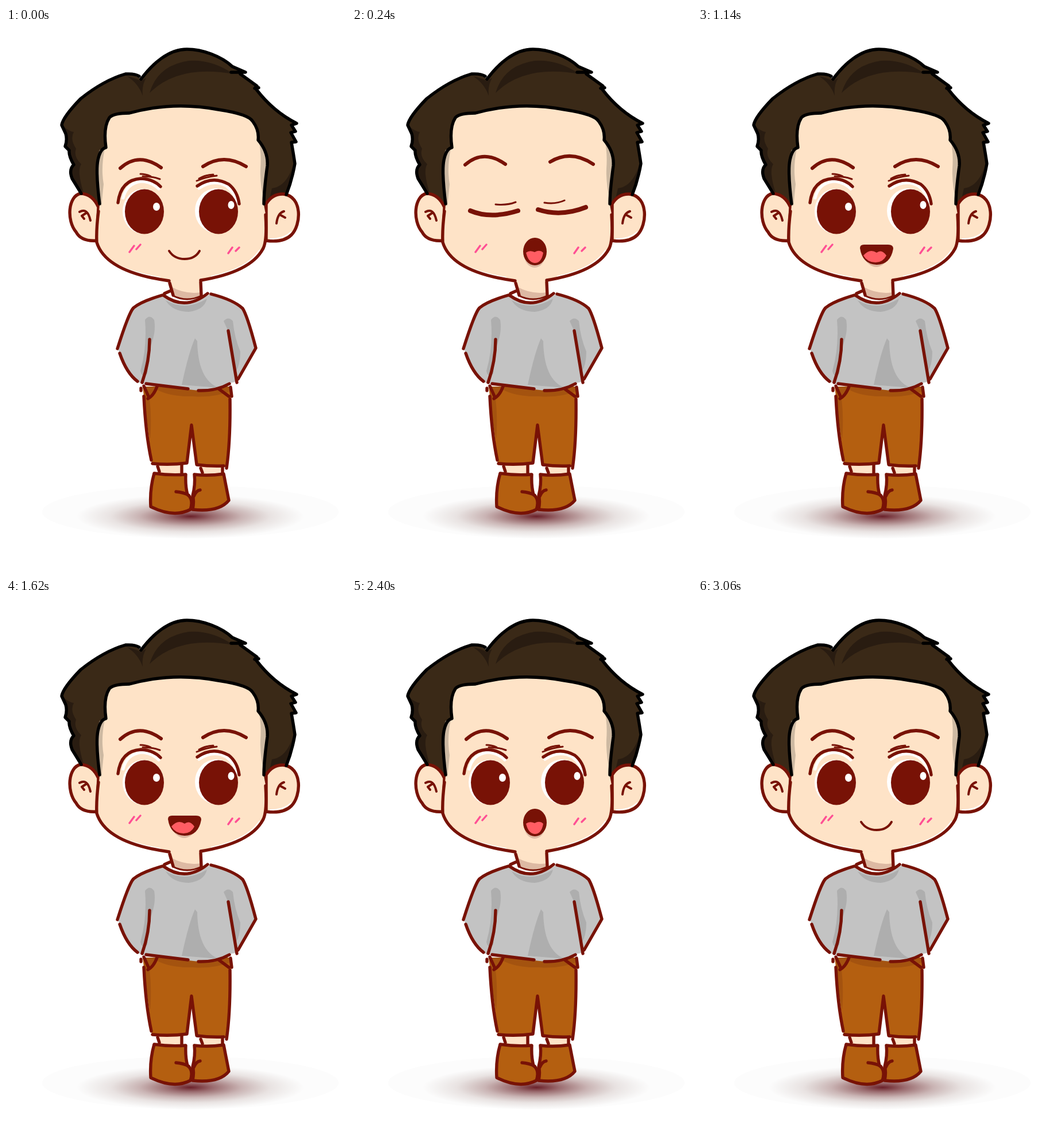
Animation, 592 px wide and 945 px high, one loop 3540 ms. Source, as an HTML page:

```html
<!DOCTYPE html>
<html lang="en">
<head>
<meta charset="utf-8">
<title>Talking boy</title>
<style>
html, body { margin: 0; width: 100%; height: 100%; overflow: hidden; background: #fff; }
svg { display: block; width: 592px; height: 945px; }
path { fill: none; stroke-linecap: round; stroke-linejoin: round; }
.line { stroke: #781206; stroke-width: 5.4; }
.thin { stroke: #781206; stroke-width: 3; }
.lid { stroke: #781206; stroke-width: 8; }
.edge { stroke: #000; stroke-width: 5.4; }
.blush { stroke: #ff4f94; stroke-width: 3.4; }
.glint { stroke: #fff; stroke-width: 5; }
.skin { fill: #fee3c7; }
.tan { fill: #ddb9a3; }
.side { fill: #cdb9a2; }
.hair { fill: #3a2917; }
.lock { fill: #291c11; }
.shirt { fill: #c3c3c3; }
.fold { fill: #aeaeae; }
.pants { fill: #b45f10; }
.crease { fill: #a4530f; }
.dark { fill: #781206; }
.tongue { fill: #ff5d63; }
.white { fill: #fff; }
[data-show] { display: none; }
</style>
</head>
<body>
<svg viewBox="0 0 592 945">
  <defs>
    <radialGradient id="ground">
      <stop offset="0" stop-color="#5a0812" stop-opacity=".9"/>
      <stop offset=".2" stop-color="#5a0c12" stop-opacity=".6"/>
      <stop offset=".45" stop-color="#5a1414" stop-opacity=".31"/>
      <stop offset=".7" stop-color="#5a2820" stop-opacity=".12"/>
      <stop offset="1" stop-color="#5a3c32" stop-opacity="0"/>
    </radialGradient>
  </defs>
  <ellipse cx="321" cy="842" rx="258" ry="46" fill="#444" fill-opacity=".014"/>
  <ellipse cx="321" cy="850" rx="198" ry="38" fill="url(#ground)"/>

  <g id="legs">
    <path class="skin" d="M265 758H306V775H265ZM339 762H378V777H339Z"/>
    <path class="line" d="M264 763L267 772M306 760V774M339 766L342 774M377 766V775"/>
    <path class="pants line" d="M258 775Q285 779 313 777Q312 797 316 812Q327 820 321 838Q292 853 252 833Q250 803 258 775Z"/>
    <path class="pants line" d="M328 777Q352 780 379 776L388 822Q371 843 325 838Q328 822 325 814Q330 794 328 777Z"/>
    <path class="line" d="M296 807Q309 808 318 813M327 815Q331 805 338 804"/>
    <path class="pants" d="M238 624H393L386 764L331 761L323 690L315 758L254 757Z"/>
    <path class="crease" d="M240 624H392V632Q360 644 325 641Q285 642 262 629L250 645Q254 680 251 715Q242 680 240 624Z"/>
    <path class="line" d="M240 641Q243 705 253 752M255 758Q285 761 315 757L323 691L332 760Q355 763 379 762M390 646Q391 718 384 766M235 627V631M240 623L249 643M263 624Q257 640 247 645M369 627L388 641M391 625L393 641"/>
  </g>

  <g id="torso">
    <path class="shirt" d="M273 465Q235 476 222 487Q214 495 195 558Q207 599 229 616L238 619Q285 626 336 631Q370 631 390 618L403 615L435 557Q420 500 410 487Q393 472 356 463Q313 490 273 465Z"/>
    <path class="fold" d="M242 508Q250 497 258 508Q262 531 250 558L246 602Q237 610 234 597Q246 555 242 508ZM329 540Q318 565 306 621L370 626Q334 612 333 545ZM379 510Q387 501 395 510Q398 540 408 563Q408 586 400 599L387 528ZM278 474Q313 494 350 471Q345 491 318 494Q289 493 278 474Z"/>
    <path class="line" d="M272 465Q235 476 222 487Q214 495 194 558M198 566Q210 601 229 615M250 542Q250 580 237 617M244 619L317 628M335 631Q366 632 389 619M387 527L402 617M404 611L435 557Q420 500 412 488Q396 473 357 463"/>
  </g>

  <g id="head">
    <path class="white" d="M274 463L288 458L292 469Q315 478 341 467L350 462Q313 490 274 463Z"/>
    <path class="skin" d="M283 436H341L340 466Q316 476 291 466Z"/>
    <path class="tan" d="M287 450Q312 464 339 460V467Q316 478 291 466Z"/>
    <path class="line" d="M285 444L291 465M339 442L340 465M274 465Q312 493 351 462M276 462L285 458"/>
    <path class="thin" d="M291 466Q315 478 340 466"/>

    <path class="hair" d="M131 288Q120 270 115 262Q109 246 118 238Q109 223 110 213L103 206Q107 195 104 184L97 169Q99 155 130 123Q170 91 208 80Q225 80 235 89C255 62 283 37 315 37C342 37 375 49 394 67L417 78L412 80L437 100L436 107Q465 145 506 166L497 170L505 181L498 183L505 198L498 200Q501 222 503 236Q498 265 488 290L450 330H163Z"/>
    <path class="lock" d="M211 84Q228 88 234 92L244 87Q236 100 238 118Q231 97 211 84ZM250 113Q264 65 318 57Q358 54 396 80Q300 63 250 113ZM98 169Q107 179 118 181Q111 194 122 210Q117 224 131 237Q123 248 135 287Q119 268 112 250L118 238L110 213L103 206Q107 195 104 184ZM500 239Q488 276 463 279L458 302L488 290Z"/>
    <path class="skin line" d="M161 312Q151 289 130 288C108 292 105 335 122 355Q131 372 158 370ZM453 306Q464 288 483 289C517 293 514 343 497 360Q483 374 453 370Z"/>
    <path class="skin" d="M163 308Q156 250 160 230Q164 210 174 208Q169 173 180 156Q187 148 215 148Q290 127 370 142Q423 150 430 163Q441 178 439 195Q457 216 455 240L449 308L452 324Q455 372 447 385Q425 425 339 439L284 440Q175 425 157 372Z"/>
    <path class="side" d="M163 212L172 210Q165 243 170 272L166 310L160 295Q156 230 163 212ZM440 195Q457 215 455 240L450 305Q442 274 443 245Q445 217 440 195Z"/>
    <path class="edge" d="M131 288Q120 270 115 262Q109 246 118 238Q109 223 110 213L103 206Q107 195 104 184L97 169Q99 155 130 123Q170 91 208 80Q225 79 232 84M235 89C255 62 283 37 315 37C342 37 375 49 394 67L417 77L392 77M408 80L437 101L433 105L440 104M436 107Q465 145 506 166L497 169L504 180L496 182L505 198L497 199Q501 222 503 236Q498 265 488 290"/>
    <path class="edge" d="M163 306Q156 250 160 230Q164 210 174 208Q169 173 180 156Q187 148 215 148Q290 127 370 142Q423 150 430 163Q441 178 439 195Q457 216 455 240Q449 284 449 306"/>
    <path class="glint" style="stroke-width:2" d="M169 394Q195 422 268 434M460 367Q484 367 496 355M358 432Q420 419 441 387"/>
    <path class="line" d="M161 319Q157 350 158 373Q174 425 284 440M452 325Q455 372 447 385Q425 425 339 439"/>
    <path class="line" style="stroke-width:4" d="M128 320Q142 312 147 335M141 321L132 327L136 332M471 340Q473 322 484 319M477 325L486 330"/>
    <path class="blush" d="M215 390L223 379M227 385L234 377M387 392L394 382M400 388L406 382"/>

    <g data-show="open">
      <ellipse class="white" cx="239" cy="319" rx="36" ry="39"/>
      <ellipse class="white" cx="366" cy="318" rx="37" ry="39"/>
      <path class="glint" d="M204 296Q210 270 236 267Q254 268 266 280M336 279Q361 262 384 275Q398 286 402 303"/>
      <ellipse class="dark" cx="241" cy="319.500" rx="34" ry="39"/>
      <ellipse class="dark" cx="370" cy="319.500" rx="34" ry="39"/>
      <ellipse class="white" cx="262" cy="311" rx="6" ry="7"/>
      <ellipse class="white" cx="392" cy="308" rx="5.500" ry="7"/>
      <path class="line" d="M195 304Q200 264 235 262Q257 263 269 276M333 275Q360 256 388 272Q403 284 406 306"/>
      <path class="line" style="stroke-width:6" d="M199 244Q231 215 270 243M343 241Q379 217 418 241"/>
      <path class="thin" d="M234 254Q244 254 252 258M238 258Q254 258 268 263M332 266Q348 259 367 257M336 262Q349 255 361 255"/>
    </g>
    <g data-show="closed">
      <path class="lid" d="M206 318Q241 333 289 318M324 316Q364 329 407 312"/>
      <path class="line" style="stroke-width:6" d="M197 238Q229 210 267 237M345 233Q381 211 420 237"/>
      <path class="thin" d="M250 307Q270 309 285 303M335 304Q355 307 370 300"/>
    </g>

    <path class="line" style="stroke-width:4" data-show="smile" d="M284 388Q293 402 311 402Q329 402 337 388"/>
    <g data-show="small">
      <path class="tan" d="M286 397Q310 435 335 397Z"/>
      <path class="dark" d="M282 383Q282 377 289 377H331Q340 377 340 384Q335 412 311 412Q286 411 282 383Z"/>
      <path class="tongue" d="M288 396Q299 383 311 391Q320 384 328 396Q322 408 309 408Q295 408 288 396Z"/>
    </g>
    <g data-show="wide">
      <path class="tan" d="M286 400Q310 432 335 398Z"/>
      <path class="dark" d="M281 376Q282 367 291 367H331Q340 368 340 378Q335 413 311 413Q284 410 281 376Z"/>
      <path class="white" d="M302 373H321L319 376H304Z"/>
      <path class="tongue" d="M287 395Q298 383 309 391Q318 383 328 393Q323 408 310 408Q295 408 287 395Z"/>
    </g>
    <g data-show="round">
      <ellipse class="tan" cx="318" cy="392" rx="19" ry="25"/>
      <ellipse class="dark" cx="318.500" cy="389" rx="20.500" ry="24"/>
      <path class="tongue" d="M303 391Q309 386 318 390Q327 385 333 391Q330 409 318 409Q307 408 303 391Z"/>
    </g>
  </g>
</svg>
<script>
const LOOP = 3540;
// start time, mouth, eyes, head drop
const poses = [
  [0, "smile"], [120, "smile", "closed"], [180, "small", "closed"],
  [240, "round", "closed"], [360, "small", "open", 3], [480, "small"], [600, "wide"],
  [720, "smile"], [900, "small"], [1020, "wide"], [1140, "small"],
  [1380, "wide"], [1500, "round"], [1620, "small"], [1800, "smile"],
  [2040, "small"], [2280, "wide"], [2400, "round"], [2520, "wide"],
  [2640, "small"], [2880, "round"], [3000, "small"], [3060, "smile"]
];
const parts = document.querySelectorAll("[data-show]");
const head = document.getElementById("head");

function draw(now) {
  const time = now % LOOP;
  const [, mouth, eyes = "open", drop = 0] = poses.findLast(([start]) => start <= time);
  for (const part of parts) {
    const name = part.dataset.show;
    part.style.display = name === mouth || name === eyes ? "inline" : "none";
  }
  head.setAttribute("transform", `translate(0 ${drop})`);
}

const origin = performance.now();
function tick() {
  draw(performance.now() - origin);
  requestAnimationFrame(tick);
}
tick();
</script>
</body>
</html>
```
